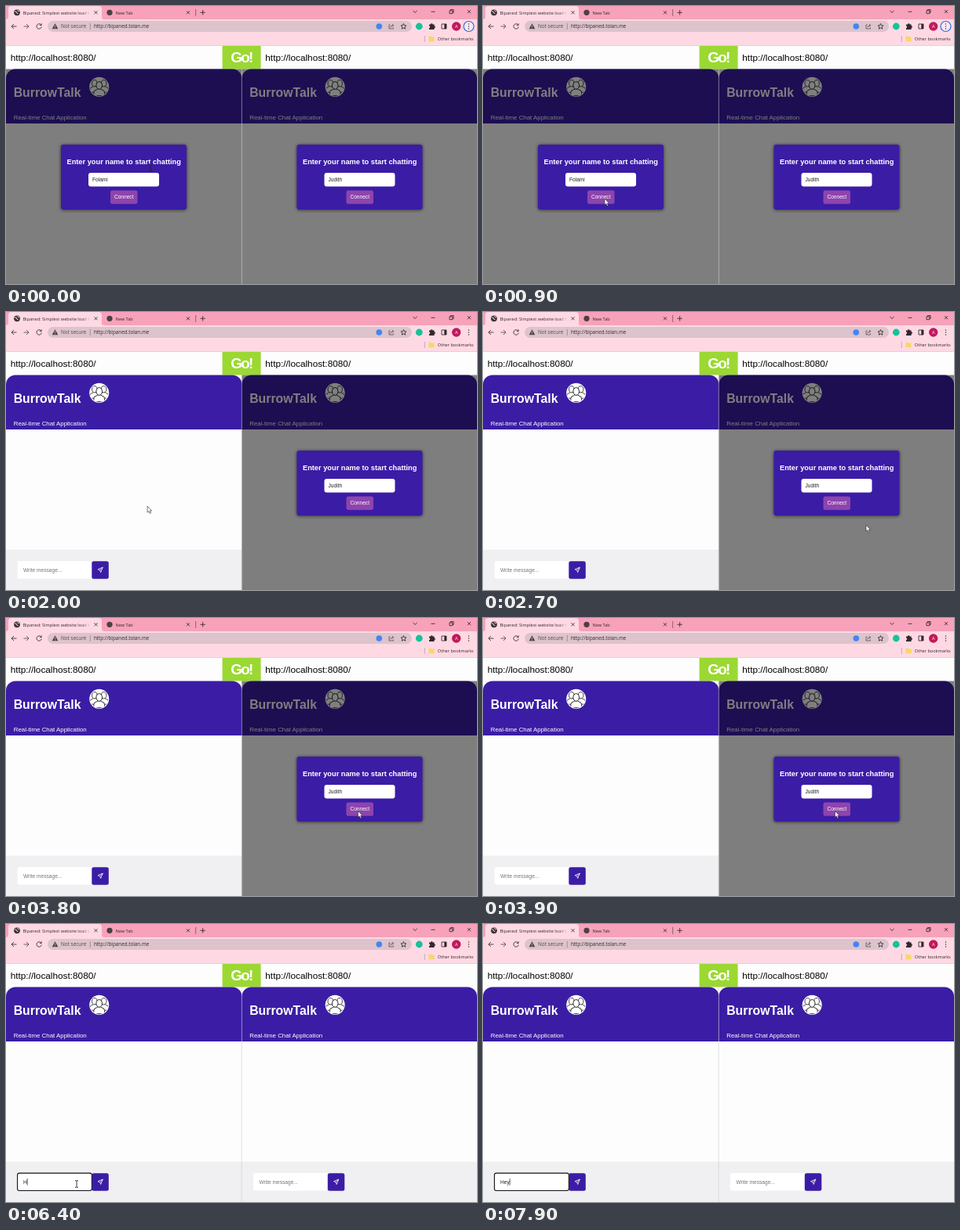
Write an HTML page that moves like this. It is 600 by 355 pixels and loops after 8 s.

```html
<!DOCTYPE html>
<html lang="en">
<head>
<meta charset="utf-8">
<title>Chat demo</title>
<style>
  html, body { margin: 0; width: 100%; height: 100%; overflow: hidden; background: #fff; }
  svg { display: block; width: 100%; height: 100%; }
  text { font-family: "Liberation Sans", Arial, sans-serif; white-space: pre; }
  .ui { font-family: "Open Sans", "Noto Sans", sans-serif; font-size: 5.6px; fill: #33282d; }
  .line { fill: none; stroke: #3a2d33; stroke-width: .9; }
  .bold { font-weight: bold; fill: #fff; }
  .small { font-size: 6.6px; }
</style>
</head>
<body>
<svg viewBox="0 0 600 355" preserveAspectRatio="none">
  <defs>
    <linearGradient id="fade">
      <stop offset="0" stop-color="#fed9e4" stop-opacity="0"/>
      <stop offset="1" stop-color="#fed9e4"/>
    </linearGradient>
    <filter id="shadow" x="-10%" y="-15%" width="120%" height="130%">
      <feDropShadow dx="0" dy="0.5" stdDeviation="2" flood-opacity=".65"/>
    </filter>
    <clipPath id="badge"><circle r="11.6"/></clipPath>
    <path id="cross" class="line" d="M-2-2l4 4m0-4l-4 4"/>
  </defs>

  <g id="browser">
    <rect width="600" height="18" fill="#f7a2ba"/>
    <path d="M0 17q3 0 3-3V4q0-4 4-4h111q4 0 4 4v10q0 3 3 3h475v34H0z" fill="#fed9e4"/>
    <circle cx="14" cy="8.3" r="3.9" fill="#3d3539"/>
    <path d="M11.2 7q2-.5 2.2 1t2 1.7M14.500 5.2q.3 1.600 2.400 1.500" stroke="#fed9e4" fill="none"/>
    <text class="ui" x="21.500" y="10.500">Bipaned: Simplest website load t</text>
    <rect x="95" y="3" width="14" height="11" fill="url(#fade)"/>
    <use href="#cross" x="114.500" y="8.300"/>
    <circle cx="132" cy="8.300" r="3.600" fill="#4b4045"/>
    <text class="ui" x="139.500" y="10.500">New Tab</text>
    <use href="#cross" x="232" y="8.300"/>
    <path class="line" d="M241.700 4v9" opacity=".6"/>
    <path class="line" d="M247.500 8.300h6.400M250.700 5.100v6.400M518.500 6l2.600 2.400L523.700 6M541.500 7.300h5M565 5.900h3.800v3.800H565zM566.300 5.900V4.600h3.800v3.800h-1.300"/>
    <use href="#cross" x="590" y="7.200"/>

    <path class="line" d="M13.500 26H7m3-3l-3 3 3 3"/>
    <path class="line" d="M22.500 26H29m-3-3l3 3-3 3" opacity=".8"/>
    <path class="line" d="M44.700 24a3.200 3.200 0 1 0 .6 2.700M45.200 22.300v2.300h-2.300"/>
    <rect x="53" y="19" width="464" height="14" rx="7" fill="#dcc3cc"/>
    <path d="M62.500 22.300l3.800 6.900h-7.600z" fill="#4f4248"/>
    <path d="M62.500 24.700v2m0 .7v1" stroke="#dcc3cc" stroke-width=".8"/>
    <text class="ui" x="70" y="28.300" style="font-size:6.400px;fill:#54474d">Not secure</text>
    <path d="M107.300 22v8" stroke="#8f7b83" stroke-width=".7"/>
    <text class="ui" x="112" y="28.300" style="font-size:6.300px">http://bipaned.tolan.me</text>

    <circle cx="475.300" cy="26" r="3.800" fill="#4285f4"/>
    <path class="line" d="M489.500 24h-1.500v5h5.500v-1.500M489.700 27.300q.5-2.600 3.800-2.600m-1.600-1.800l1.800 1.800-1.800 1.800" opacity=".7"/>
    <path class="line" d="M506.500 22.500l1 2.300 2.500.2-1.900 1.700.6 2.500-2.200-1.300-2.200 1.300.6-2.500-1.900-1.700 2.500-.2z"/>
    <circle cx="526.300" cy="26" r="4.400" fill="#15c39a"/>
    <path d="M539 23.500h2a1.300 1.300 0 0 1 2.600 0h2v2a1.300 1.300 0 0 1 0 2.600v1.800H539v-2a1.200 1.200 0 0 0 0-2.400z" fill="#33282d"/>
    <path class="line" d="M555 23h6v6h-6z"/>
    <path d="M558.300 23h2.700v6h-2.700z" fill="#33282d"/>
    <circle cx="573.700" cy="26" r="5.700" fill="#c2185b"/>
    <text class="ui" x="573.700" y="28" text-anchor="middle" style="fill:#fff">A</text>
    <circle id="ring" cx="589.500" cy="26" r="6.500" fill="#fff" fill-opacity=".4" stroke="#2f6be0" stroke-width="1.200"/>
    <path d="M589.500 23v0m0 3v0m0 3v0" stroke="#33282d" stroke-width="1.400" stroke-linecap="round"/>
    <path d="M533.300 38v8" stroke="#b493a0" stroke-width=".7"/>
    <path d="M538.500 38.500h2.800l.8 1h3.600v5.800h-7.200z" fill="#f5d76a"/>
    <text class="ui" x="549.800" y="44">Other bookmarks</text>
  </g>

  <path d="M0 50.500h600V81H0z" fill="#fdfdfd"/>
  <path d="M0 50.500h600" stroke="#d9c3cb" stroke-width=".7"/>
  <g font-size="11.800">
    <text x="5.700" y="70">http://localhost:8080/</text>
    <text x="330.300" y="70">http://localhost:8080/</text>
  </g>
  <rect x="275.600" y="51" width="49" height="29.700" fill="#9bd832"/>
  <text class="bold" x="286.300" y="72.300" font-size="19" letter-spacing="-1.900">Go!</text>

  <g id="panels"></g>
  <path d="M300.200 80.500v274.500" stroke="#aaa" stroke-width=".8" opacity=".45"/>

  <g id="arrow">
    <path d="M0 0v8l1.800-1.600 1.300 2.900 1.400-.6-1.300-2.800h2.400z" fill="#fff" stroke="#222" stroke-width=".6"/>
  </g>
  <path id="beam" d="M-2-4.300h1.500l.5.500.5-.500H2M0-4v8M-2 4.300h1.500L0 3.800l.5.500H2" fill="none" stroke="#222" stroke-width=".9"/>
</svg>

<script>
const LOOP = 8000;
const $ = id => document.getElementById(id);

const person = (x, y, s) => `
  <g transform="translate(${x} ${y}) scale(${s})">
    <path d="M-6 9.500V6q0-2.600 3-3.200l1.500-1h3l1.500 1q3 .6 3 3.200v3.500z"/>
    <ellipse cy="-2" rx="3.300" ry="4.200"/>
  </g>`;

const panel = (id, x, w, name) => `
  <g transform="translate(${x})">
    <rect y="80.500" width="${w}" height="274.500" fill="#fdfdfd"/>
    <path d="M0 150V92.500a12 12 0 0 1 12-12h${w - 24}a12 12 0 0 1 12 12V150z" fill="#3b1da5"/>
    <text class="bold" x="9.700" y="116" font-size="15.800">BurrowTalk</text>
    <g transform="translate(118.700 103.300)">
      <circle r="12.500" fill="#fff"/>
      <g clip-path="url(#badge)" fill="#fff" stroke="#222" stroke-width=".85">
        ${person(-5.9, -2.6, 1)}${person(5.9, -2.6, 1)}${person(0, .4, 1.15)}
      </g>
    </g>
    <text x="9.700" y="145" font-size="7.900" fill="#fff">Real-time Chat Application</text>
    <g id="${id}Footer">
      <rect y="303.500" width="${w}" height="51.500" fill="#f0eff1"/>
      <rect x="14.500" y="318" width="95" height="22.500" rx="3" fill="#fff"/>
      <rect x="109.300" y="318.200" width="21.500" height="22.500" rx="2.500" fill="#3b1da5"/>
      <path d="M123.300 326l-6.300 2.700 2.700 1 1 2.800zl-3.600 3.700" fill="none" stroke="#fff" stroke-width=".8" stroke-linejoin="round"/>
      <rect id="${id}Focus" x="14.500" y="318.100" width="94.800" height="22.300" rx="2.500" fill="#fff" stroke="#111" stroke-width="1.050" visibility="hidden"/>
      <text id="${id}Text" class="small" x="22" y="331.700" fill="#757575">Write message...</text>
    </g>
    <g id="${id}Modal">
      <rect y="80.500" width="${w}" height="274.500" fill="#000" opacity=".5"/>
      <rect x="70" y="177" width="160" height="83" rx="3" fill="#3b1da5" filter="url(#shadow)"/>
      <text class="bold" x="150.200" y="201.500" font-size="9.250" text-anchor="middle">Enter your name to start chatting</text>
      <rect x="105" y="213" width="90" height="17.500" rx="3" fill="#fff"/>
      <text class="small" x="110" y="224" fill="#222">${name}</text>
      <rect x="133" y="235.500" width="34.500" height="17.300" rx="2.500" fill="#8e44ad"/>
      <text class="small" x="150.200" y="246.400" fill="#fff" text-anchor="middle">Connect</text>
    </g>
  </g>`;

$("panels").innerHTML = panel("left", 0, 300.5, "Folami") + panel("right", 300.5, 299.5, "Judith") +
  '<path id="caret" d="M0 325v8.500" stroke="#111" stroke-width=".7"/>';

// time, x, y of the pointer
const route = [
  [0, 184, 206], [200, 184, 206], [800, 155, 246], [1900, 155, 246],
  [2500, 488, 272], [2900, 488, 272], [3500, 448.5, 246.5], [4100, 448.5, 246.5],
  [4700, 99, 332], [5000, 99, 332], [5300, 90, 332], [LOOP, 90, 332]
];
const FOCUS = 5050;
const typed = [[FOCUS, ""], [6200, "H"], [6900, "He"], [7450, "Hey"]];

const show = (id, on) => $(id).setAttribute("visibility", on ? "visible" : "hidden");

function pointer(t) {
  const i = route.findIndex(p => p[0] > t);
  const [t0, x0, y0] = route[i - 1], [t1, x1, y1] = route[i];
  const u = (t - t0) / (t1 - t0), e = u * u * (3 - 2 * u);
  return [x0 + (x1 - x0) * e, y0 + (y1 - y0) * e];
}

function connect(id, done) {
  show(id + "Modal", !done);
  show(id + "Footer", done);
}

function draw(t) {
  connect("left", t >= 1050);
  connect("right", t >= 4050);
  show("ring", t < 1450);

  const focused = t >= FOCUS;
  const [since, message] = typed.filter(k => k[0] <= t).pop() || [0, ""];
  const label = $("leftText");
  label.textContent = message || "Write message...";
  label.setAttribute("fill", message ? "#222" : "#757575");
  show("leftFocus", focused);
  show("caret", focused && (t - since) % 1060 < 530);
  const caretX = message ? 22.4 + label.getComputedTextLength() : 22;
  $("caret").setAttribute("transform", `translate(${caretX})`);

  const [x, y] = pointer(t);
  const overText = t < 250 || t > 4650;
  for (const id of ["arrow", "beam"]) $(id).setAttribute("transform", `translate(${x} ${y})`);
  show("arrow", !overText);
  show("beam", overText && t < 7450);
}

const start = performance.now();
function tick() {
  draw((performance.now() - start) % LOOP);
  requestAnimationFrame(tick);
}
tick();
</script>
</body>
</html>
```
